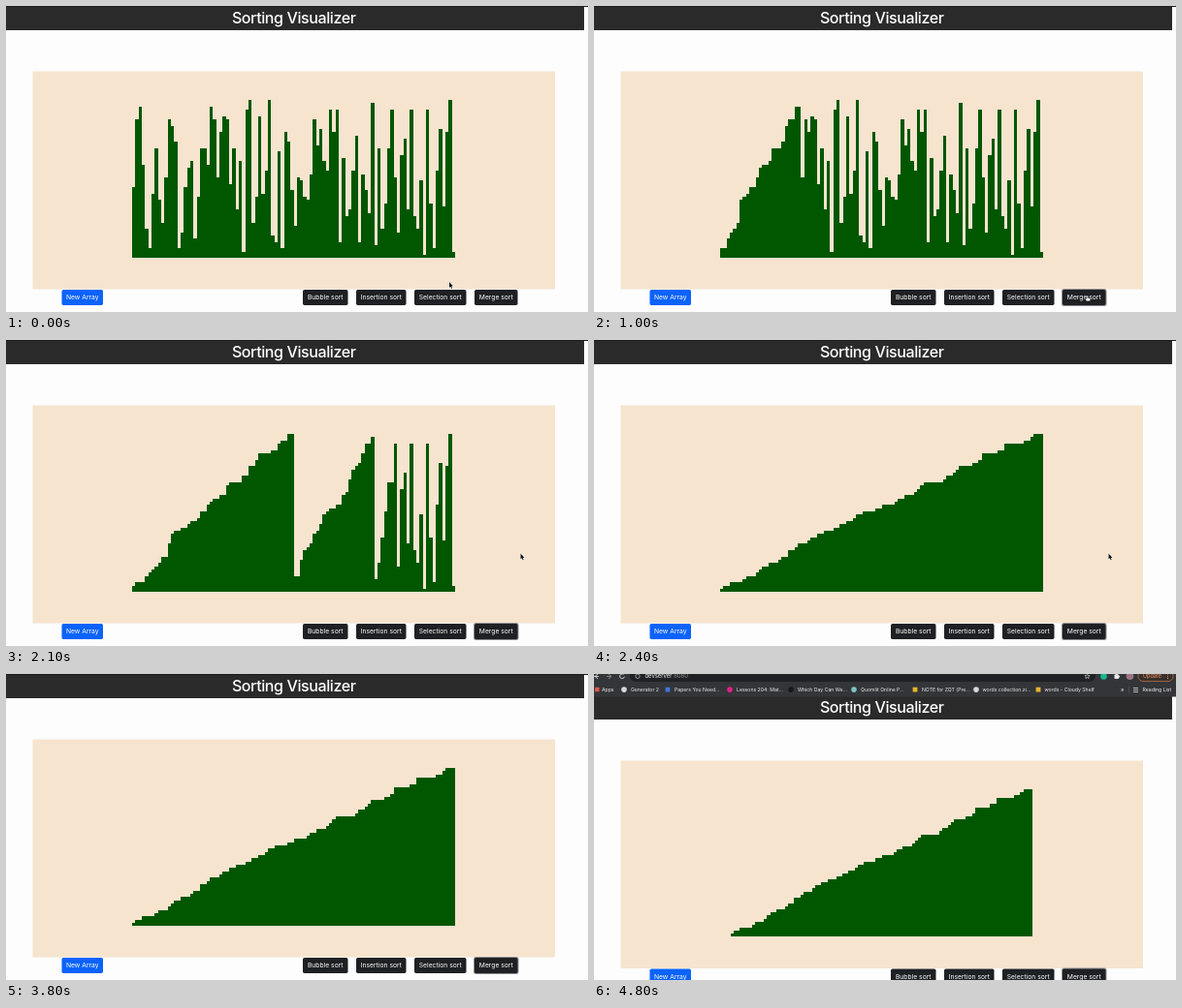
An HTML page with a canvas that plays this animation: 600 by 316 pixels, repeating every 4.9 s.

```html
<!DOCTYPE html>
<html lang="en">
<head>
<meta charset="utf-8">
<title>Sorting Visualizer</title>
<style>
  html, body { margin: 0; width: 100%; height: 100%; overflow: hidden; background: #fdfdfd; }
  canvas { display: block; }
</style>
</head>
<body>
<canvas id="stage" width="600" height="316"></canvas>
<script>
const ctx = document.getElementById('stage').getContext('2d');
const LOOP = 4900, STEP = 100;

const values = [
  22, 43, 47, 29, 9, 3, 20, 34, 18, 11, 25, 43, 41, 36, 3, 8, 22, 28, 30, 6,
  19, 34, 34, 29, 47, 43, 25, 39, 44, 43, 23, 34, 15, 30, 2, 46, 49, 11, 19, 44,
  20, 27, 49, 7, 5, 33, 3, 39, 36, 21, 10, 25, 24, 19, 18, 26, 43, 35, 40, 30,
  27, 46, 39, 46, 5, 31, 13, 15, 27, 38, 5, 26, 21, 14, 48, 4, 34, 9, 17, 34,
  46, 25, 8, 32, 37, 15, 46, 13, 9, 24, 1, 46, 17, 3, 27, 40, 16, 39, 49, 2
];

// One snapshot of the array after every merge.
const snapshots = [values.slice()];
function mergeSort(lo, hi) {
  if (lo >= hi) return;
  const mid = (lo + hi) >> 1;
  mergeSort(lo, mid);
  mergeSort(mid + 1, hi);
  const part = values.slice(lo, hi + 1).sort((a, b) => a - b);
  values.splice(lo, part.length, ...part);
  snapshots.push(values.slice());
}
mergeSort(0, values.length - 1);

// Piecewise linear interpolation over [time, value] pairs.
function track(keys, t) {
  if (t <= keys[0][0]) return keys[0][1];
  for (let i = 1; i < keys.length; i++) {
    const [t0, a] = keys[i - 1], [t1, b] = keys[i];
    if (t <= t1) return a + (b - a) * (t - t0) / (t1 - t0);
  }
  return keys[keys.length - 1][1];
}
const mergeCount = [[400, 0], [1000, 25], [1400, 49], [2100, 79], [2400, 99]];
const cursorX = [[0, 457], [100, 504], [300, 508], [1000, 508], [1300, 530.5]];
const cursorY = [[0, 285], [100, 297], [300, 299], [1000, 299], [1300, 220.5]];
const toolbarReveal = [[3800, 0], [4200, 1]];

function rect(x, y, w, h, color) {
  ctx.fillStyle = color;
  ctx.fillRect(x, y, w, h);
}

function round(x, y, w, h, r, fill, stroke, line = 1) {
  ctx.beginPath();
  ctx.roundRect(x, y, w, h, r);
  if (fill) { ctx.fillStyle = fill; ctx.fill(); }
  if (stroke) { ctx.strokeStyle = stroke; ctx.lineWidth = line; ctx.stroke(); }
}

function dot(x, y, r, color) {
  ctx.beginPath();
  ctx.arc(x, y, r, 0, 7);
  ctx.fillStyle = color;
  ctx.fill();
}

function path(points, color, width = 0.9) {
  ctx.beginPath();
  points.forEach(([x, y]) => ctx.lineTo(x, y));
  ctx.strokeStyle = color;
  ctx.lineWidth = width;
  ctx.stroke();
}

function label(text, x, y, size, color = '#fff', align = 'left', weight = 400, spacing = 0) {
  ctx.font = `${weight} ${size}px Inter, sans-serif`;
  ctx.letterSpacing = spacing + 'px';
  ctx.textAlign = align;
  ctx.fillStyle = color;
  ctx.fillText(text, x, y);
}

function button(text, x, w, y, color, focused) {
  if (focused) round(x - 1, y - 1, w + 2, 18, 2.5, '#8d8e91');
  round(x, y, w, 16, 1.7, color);
  label(text, x + w / 2, y + 10.4, 6.75, '#fff', 'center');
}

const bookmarks = [
  ['Generator 2', 31, 38, '#d5d7da'],
  ['Papers You Need...', 76, 83, '#3f73d8', true],
  ['Lessons 204: Mat...', 140, 147, '#e0218a'],
  ['Which Day Can We...', 203, 210, '#15171c'],
  ['Quomlit Online P...', 268, 275, '#7fc4c0'],
  ['NOTE for ZQT (Pre...', 331, 338, '#e5b52c', true],
  ['words collection.zi...', 394, 400.5, '#d5d7da'],
  ['words - Cloudy Shelf', 458, 464.5, '#e5b52c', true]
];

function toolbar() {
  const pale = '#d8dadd';
  rect(0, -2, 600, 25.5, '#343538');
  round(37, -5, 480, 13, 6, '#202124');
  path([[4, 0], [1, 2.5], [4, 5]], pale);
  path([[0, 2.5], [5, 2.5]], pale);
  path([[15, 0], [18, 2.5], [15, 5]], '#85878a');
  path([[13, 2.5], [18, 2.5]], '#85878a');
  ctx.beginPath();
  ctx.arc(29, 2.3, 2.4, 0.2, 5.4);
  ctx.strokeStyle = pale;
  ctx.stroke();
  ctx.beginPath();
  ctx.arc(45, 2.3, 2.2, 0, 7);
  ctx.lineWidth = 0.6;
  ctx.stroke();
  label('devserver', 52.5, 4.3, 5.9, '#f1f2f3');
  label(':8080', 52.5 + ctx.measureText('devserver').width, 4.3, 5.9, '#8d9094');

  const star = Array.from({ length: 11 }, (_, i) => {
    const r = i % 2 ? 1.2 : 2.8, a = i * Math.PI / 5 - Math.PI / 2;
    return [508.5 + r * Math.cos(a), 2.4 + r * Math.sin(a)];
  });
  path(star, pale, 0.6);
  dot(525.5, 2.4, 3.3, '#17b890');
  round(536.5, 0.5, 4.5, 4.5, 0.7, '#e6e7e9');
  dot(541, 2.7, 1.1, '#e6e7e9');
  dot(538.8, 0.5, 1.1, '#e6e7e9');
  dot(552.5, 2.3, 3.8, '#9a7580');
  round(561, -3, 36, 10.5, 5, '#38302d', '#c97a48', 0.7);
  label('Update', 566, 4.3, 5.5, '#f0935a');
  [0, 2.2, 4.4].forEach(y => dot(591.5, y, 0.55, '#f0935a'));

  round(1, 13.8, 4.5, 4.5, 0.5, '#d9574a');
  label('Apps', 8, 18.3, 5.15, '#eceded');
  for (const [text, iconX, textX, color, square] of bookmarks) {
    if (square) rect(iconX - 2.4, 13.7, 4.8, 4.8, color);
    else dot(iconX, 16.1, 2.8, color);
    label(text, textX, 18.3, 5.15, '#eceded');
  }
  label('»', 543, 18.3, 6, '#eceded');
  rect(551.5, 12.5, 0.5, 8, '#5c5e62');
  [14, 16, 18].forEach(y => rect(556, y, 5, 0.8, pale));
  label('Reading List', 565.5, 18.3, 5.15, '#eceded');
}

function bars(data, base, scale) {
  const unit = 3.33 * scale, left = 296.5 - unit * 50;
  ctx.fillStyle = '#005700';
  data.forEach((v, i) => {
    const x = Math.round(left + i * unit), next = Math.round(left + (i + 1) * unit);
    const top = Math.round(base - v * unit);
    ctx.fillRect(x, top, next - x, Math.round(base) - top);
  });
}

function arrow(x, y) {
  ctx.beginPath();
  [[0, 0], [0, 5.8], [1.3, 4.7], [2.2, 6.8], [3.1, 6.4], [2.2, 4.4], [3.9, 4.3]]
    .forEach(([dx, dy]) => ctx.lineTo(x + dx, y + dy));
  ctx.closePath();
  ctx.strokeStyle = '#fff';
  ctx.lineWidth = 1;
  ctx.stroke();
  ctx.fillStyle = '#111';
  ctx.fill();
}

function hand(x, y) {
  round(x, y, 1.6, 4, 0.8, '#fff', '#111', 0.4);
  round(x - 1, y + 2.4, 4.6, 3.4, 1.2, '#fff', '#111', 0.4);
}

function draw(t) {
  const reveal = track(toolbarReveal, t);
  const shift = 22 * reveal;
  const scale = 1 - 0.067 * reveal;
  const panelHeight = 225 - 10.5 * reveal;
  const buttonY = 293 + 11.5 * reveal;

  rect(0, 0, 600, 316, '#fdfdfd');
  rect(0, shift, 596, 25, '#2a2a2b');
  label('Sorting Visualizer', 296.7, shift + 18, 16, '#fff', 'center', 500, -0.4);
  rect(27.5, 67.5 + shift, 538.5, panelHeight, '#f6e4cf');
  bars(snapshots[Math.floor(track(mergeCount, t) + 1e-6)], 260.2 + 11 * reveal, scale);

  button('New Array', 57.5, 42.5, buttonY, '#0b63fb');
  button('Bubble sort', 306, 46.5, buttonY, '#1e2023');
  button('Insertion sort', 361, 51.5, buttonY, '#1e2023');
  button('Selection sort', 421, 53.5, buttonY, '#1e2023');
  button('Merge sort', 483, 44.5, buttonY, '#1e2023', t >= 400);

  if (reveal > 0) {
    ctx.save();
    ctx.translate(0, shift - 22);
    toolbar();
    ctx.restore();
  } else {
    rect(0, 0, 600, 1, '#1b1b1c');
  }

  if (t < 3000) {
    const pointer = t >= 100 && t <= 1000 ? hand : arrow;
    pointer(track(cursorX, t), track(cursorY, t));
  }
}

function tick(now) {
  draw(Math.floor(now % LOOP / STEP) * STEP);
  requestAnimationFrame(tick);
}
requestAnimationFrame(tick);
</script>
</body>
</html>
```
